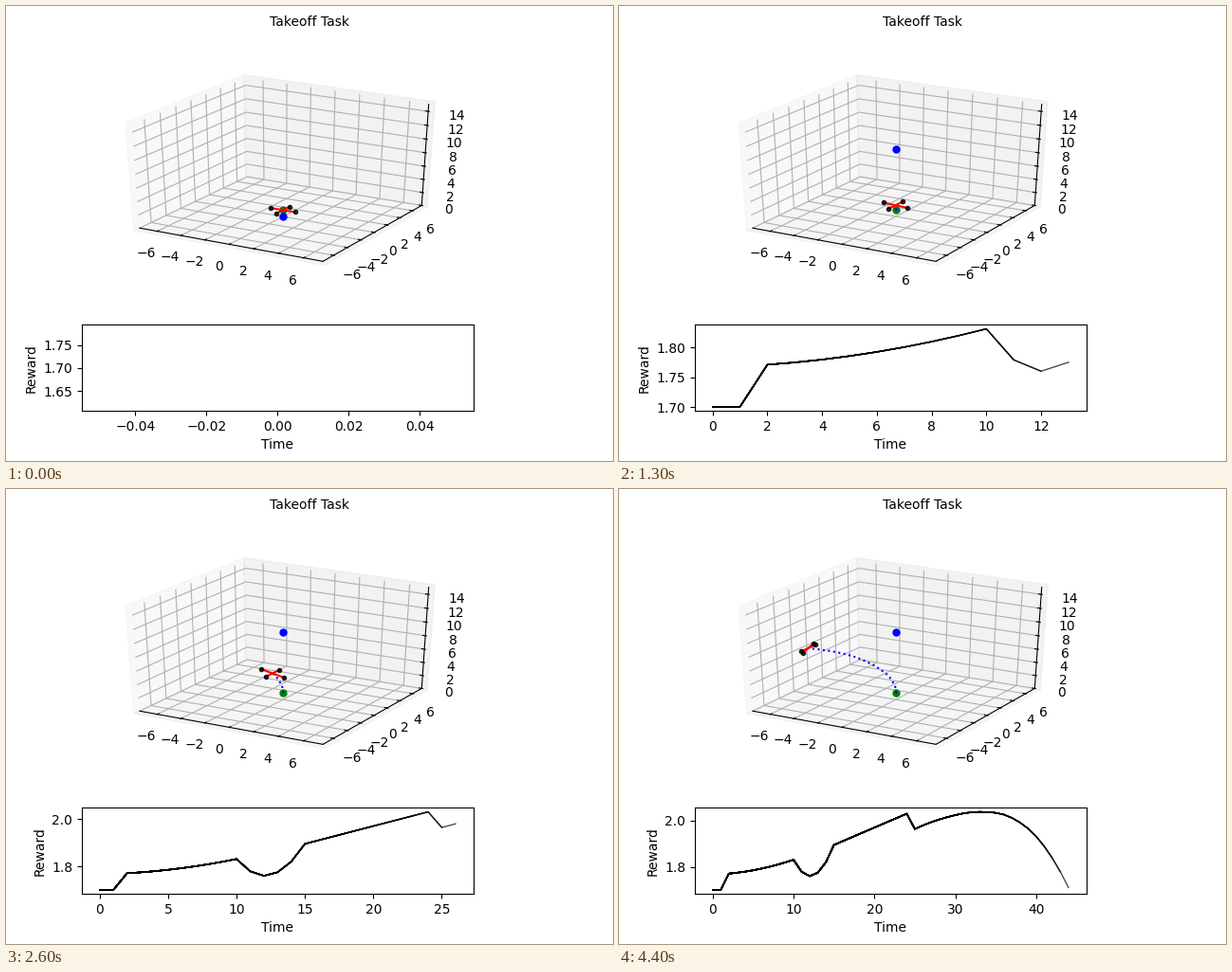
A matplotlib script for the animation above (4500 ms loop, 640 by 480 pixels).

```python
import numpy as np
import matplotlib.pyplot as plt
from matplotlib.animation import FuncAnimation

plt.rcParams["font.family"] = "DejaVu Sans"

FRAMES = 45
SPAN = 15.0            # every axis covers 15 units
HALF = SPAN / 2
PAD = HALF + SPAN / 48  # panes reach slightly past the axes
GAP = 1.49             # distance of the tick labels from the axes
DIST = 10.0
AZIM, ELEV = np.radians([-60, 30])

EYE = np.array([np.cos(AZIM) * np.cos(ELEV), np.sin(AZIM) * np.cos(ELEV), np.sin(ELEV)])
RIGHT = np.array([-np.sin(AZIM), np.cos(AZIM), 0])
UP = np.cross(EYE, RIGHT)


def project(points):
    """Perspective view of points given around the centre of the box."""
    p = np.atleast_2d(points) / SPAN
    depth = DIST - p @ EYE
    return p @ RIGHT / depth, p @ UP / depth


def glide(t, times, values):
    """Smooth cubic curve through a few key values."""
    times, values = np.asarray(times, float), np.asarray(values, float)
    slope = np.gradient(values, times, edge_order=2)
    i = np.clip(np.searchsorted(times, t, side="right") - 1, 0, len(times) - 2)
    h = times[i + 1] - times[i]
    s = (t - times[i]) / h
    return ((1 + 2 * s) * (1 - s) ** 2 * values[i] + s * (1 - s) ** 2 * h * slope[i]
            + s * s * (3 - 2 * s) * values[i + 1] - s * s * (1 - s) * h * slope[i + 1])


# Flight
steps = np.arange(FRAMES)
keys = [0, 8, 17, 26, 33, 37, 44]
fly_x = glide(steps, keys, [0, 0, -0.13, -0.86, -2.32, -3.70, -7.38])
fly_z = glide(steps, keys, [1, 1.27, 2.23, 3.73, 4.94, 5.53, 5.60])
pitch = np.radians(glide(steps, keys, [0, 2, 9, 20.5, 48, 65.5, 120]))
centers = np.column_stack([fly_x, 0 * fly_x, fly_z - HALF])

# Reward
climb = np.arange(9)
reward = np.concatenate([
    [1.7, 1.7006],
    1.771 + 0.00318 * climb + 0.00054 * climb ** 2,
    [1.779, 1.760, 1.775, 1.820],
    np.linspace(1.895, 2.030, 10),
    glide(np.arange(25, FRAMES), [25, 29, 33, 37, 40, 44],
          [1.964, 2.015, 2.038, 2.012, 1.932, 1.711]),
])

fig = plt.figure(figsize=(6.4, 4.8), dpi=100, facecolor="white")
fig.suptitle("Takeoff Task", fontsize=10, fontweight="normal")
grid = fig.add_gridspec(8, 6, left=0.125, right=0.9, bottom=0.11, top=0.88,
                        hspace=0.05, wspace=0.05)
space = fig.add_subplot(grid[:5, :5])
space.set(xlim=(-0.095, 0.09), ylim=(-0.095, 0.09))
space.axis("off")
chart = fig.add_subplot(grid[6:, :5])
chart.set(xlabel="Time", ylabel="Reward")


def stroke(points, color, z, **style):
    return space.plot(*project(points), color=color, zorder=z, **style)[0]


def pane(corners, shade):
    space.fill(*project(np.array(corners) * PAD), facecolor=shade, edgecolor=shade,
               alpha=0.5, linewidth=1, zorder=0)


def tick(mark, line, label, value):
    stroke(line, "#b0b0b0", 1, lw=0.8)
    stroke(mark, "black", 1.2, lw=0.8, solid_capstyle="butt")
    x, y = project(label)
    space.text(x[0], y[0], str(value).replace("-", "\u2212"), ha="center", va="top",
               fontsize=10, zorder=1.3)


def draw_box():
    pane([(-1, -1, -1), (-1, 1, -1), (-1, 1, 1), (-1, -1, 1)], "0.95")
    pane([(-1, 1, -1), (1, 1, -1), (1, 1, 1), (-1, 1, 1)], "0.9")
    pane([(-1, -1, -1), (1, -1, -1), (1, 1, -1), (-1, 1, -1)], "0.925")
    a, far = HALF, HALF + GAP
    out, into = HALF + SPAN / 120, HALF - SPAN / 60
    for v in range(-6, 7, 2):
        tick([(v, -out, -a), (v, -into, -a)],
             [(v, -a, -a), (v, a, -a), (v, a, a)], (v, -far, -far), v)
        tick([(out, v, -a), (into, v, -a)],
             [(a, v, -a), (-a, v, -a), (-a, v, a)], (far, v, -far), v)
    for v in range(0, 15, 2):
        h = v - HALF
        tick([(out, a, h), (into, a, h)],
             [(-a, -a, h), (-a, a, h), (a, a, h)], (far, far, h), v)
    for ends in ([(-a, -a, -a), (a, -a, -a)],
                 [(a, -a, -a), (a, a, -a)],
                 [(a, a, -a), (a, a, a)]):
        stroke(ends, "black", 1.1, lw=0.8)


draw_box()
stroke(centers[0], "green", 2, marker="o", ms=5, ls="none")
target = stroke((0, 0, 0), "blue", 2.1, marker="o", ms=5, ls="none")
path = stroke(centers[:1], "blue", 2.2, ls=":", lw=1.5)
arms = [stroke(centers[:1], "red", 2.3, lw=1.5) for _ in range(2)]
rotors = stroke(centers[:1], "black", 2.4, marker="o", ms=3, ls="none", alpha=0.8)

# Each step lays a longer curve over the earlier ones, so old parts look darker.
curves = [chart.plot(steps[:k + 1], reward[:k + 1], color="black", lw=1, alpha=0.7)[0]
          for k in range(1, FRAMES)]


def limits(low, high):
    margin = 0.05 * (high - low)
    return low - margin, high + margin


def draw(t):
    target.set_data(*project((0, 0, (10 if t else 0) - HALF)))
    path.set_data(*project(centers[:t + 1]))

    nose = np.array([np.cos(pitch[t]), 0, -np.sin(pitch[t])])
    side = np.array([0, 1, 0])
    tips = [centers[t] + s * arm for arm in (nose, side) for s in (-1, 1)]
    for i, arm in enumerate(arms):
        arm.set_data(*project(tips[2 * i:2 * i + 2]))
    rotors.set_data(*project(tips))

    for k, curve in enumerate(curves, 1):
        curve.set_visible(k <= t)
    if t:
        seen = reward[:t + 1]
        chart.set_xlim(limits(0, t))
        chart.set_ylim(limits(seen.min(), seen.max()))
    else:
        chart.set_xlim(limits(-0.05, 0.05))
        chart.set_ylim(limits(reward[0] * 0.95, reward[0] * 1.05))


anim = FuncAnimation(fig, draw, frames=FRAMES, interval=100, repeat=True,
                     repeat_delay=0, blit=False)
plt.show()
```
